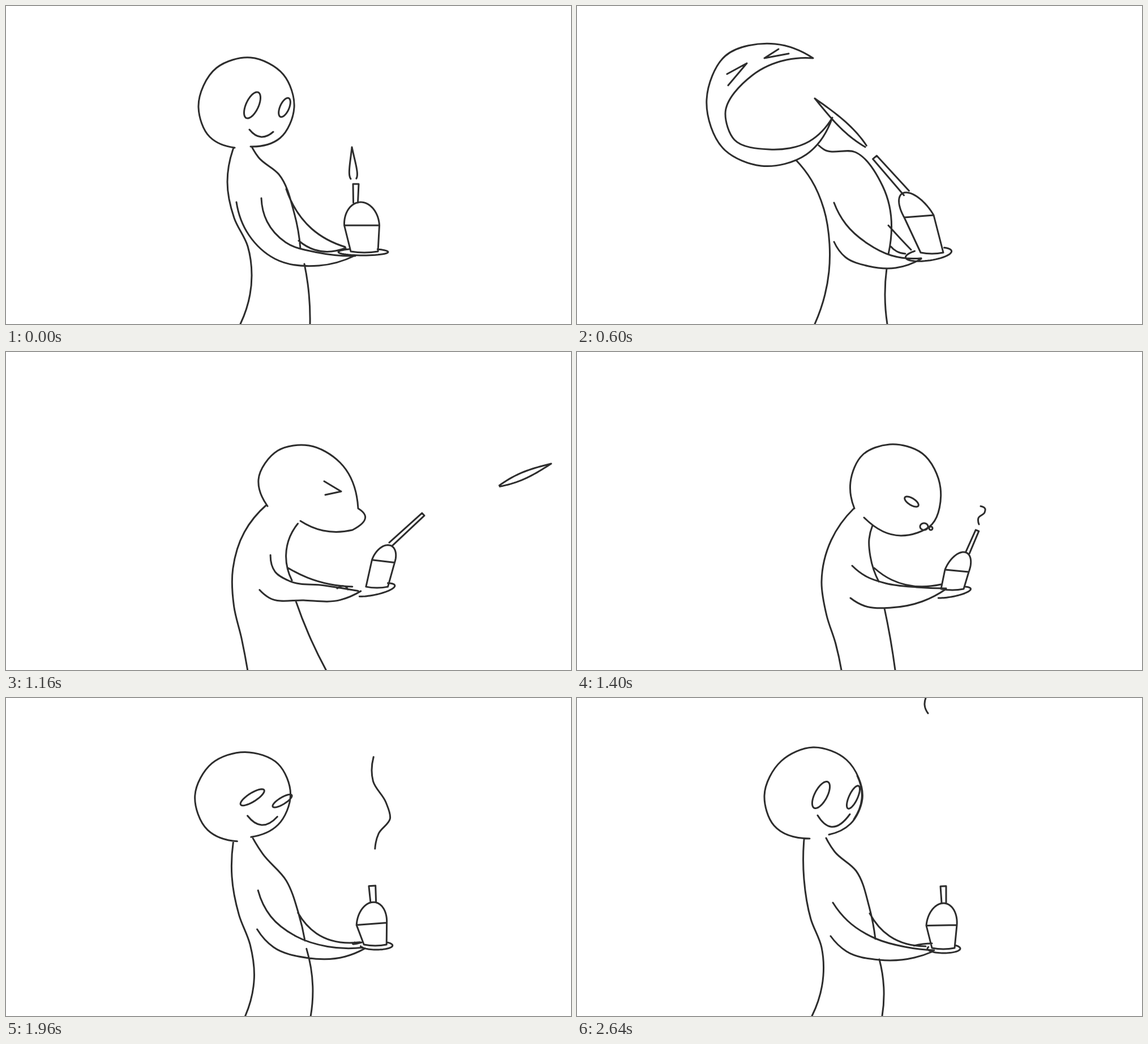
Animation, 998 px wide and 561 px high, one loop 2.88 s. Source, as an HTML page:

```html
<!DOCTYPE html>
<html lang="en">
<head>
<meta charset="utf-8">
<title>Birthday cupcake</title>
<style>
  html, body { margin: 0; width: 100%; height: 100%; overflow: hidden; background: #fff; }
  svg { display: block; width: 100%; height: 100%; }
  path { fill: none; stroke: #2d2d2d; stroke-width: 3; stroke-linecap: round; stroke-linejoin: round; }
</style>
</head>
<body>
<svg viewBox="0 0 998 561"><path id="ink"/></svg>
<script>
const line = pts => 'M' + pts.join('L');

// Smooth stroke through a few x, y pairs, with parabolic tangents.
function curve(flat) {
  const pts = [];
  for (let i = 0; i < flat.length; i += 2) pts.push([flat[i], flat[i + 1]]);
  if (!pts.length) return '';
  const end = pts.length - 1;
  const gaps = pts.slice(1).map((p, i) => Math.hypot(p[0] - pts[i][0], p[1] - pts[i][1]));
  const slope = (i, k) => (pts[i + 1][k] - pts[i][k]) / gaps[i];
  const tangent = (i, k) => {
    if (end === 1) return slope(0, k);
    if (i === 0) return 2 * slope(0, k) - tangent(1, k);
    if (i === end) return 2 * slope(end - 1, k) - tangent(end - 1, k);
    return (gaps[i] * slope(i - 1, k) + gaps[i - 1] * slope(i, k)) / (gaps[i - 1] + gaps[i]);
  };
  const handle = (i, len) => [0, 1].map(k => pts[i][k] + tangent(i, k) * len / 3);
  return `M${pts[0]}` + gaps.map((gap, i) =>
    `C${handle(i, gap)} ${handle(i + 1, -gap)} ${pts[i + 1]}`).join('');
}

// Arc of the ellipse spanned by the half axes (ux, uy) and (vx, vy).
function arc(x, y, ux, uy, vx, vy, from, to) {
  return line(Array.from({ length: 41 }, (_, i) => {
    const a = (from + (to - from) * i / 40) * Math.PI / 180, c = Math.cos(a), s = Math.sin(a);
    return [x + c * ux + s * vx, y + c * uy + s * vy];
  }));
}

function oval([x, y, rx, ry, tilt, from = 0, to = 360]) {
  const c = Math.cos(tilt * Math.PI / 180), s = Math.sin(tilt * Math.PI / 180);
  return arc(x, y, rx * c, rx * s, -ry * s, ry * c, from, to);
}

function cupcake([x, y, half, topX, topY, rimX, rimY, domeX, domeY]) {
  const left = [topX - rimX, topY - rimY], right = [topX + rimX, topY + rimY];
  return line([[x - half, y], left, right, [x + half, y]])
    + curve([x - half, y, x, y + 2, x + half, y])
    + arc(topX, topY, rimX, rimY, domeX, domeY, 0, 180);
}

// Point at fraction u of an axis, pushed sideways.
function beside(x, y, tipX, tipY, u, push) {
  const dx = tipX - x, dy = tipY - y, len = Math.hypot(dx, dy);
  return [x + dx * u - dy / len * push, y + dy * u + dx / len * push];
}

function candle([x, y, tipX, tipY, base, top]) {
  return line([[0, base], [1, top], [1, -top], [0, -base]].map(([u, push]) => beside(x, y, tipX, tipY, u, push)));
}

function flame([x, y, tipX, tipY, width, skew]) {
  return line(Array.from({ length: 41 }, (_, i) => {
    const side = i / 20 - 1, u = 1 - .96 * Math.abs(side);
    return beside(x, y, tipX, tipY, u, Math.sign(side) * width * Math.sin(Math.PI * u ** skew));
  }));
}

const vee = ([ax, ay, bx, by, cx, cy]) => line([[ax, ay], [bx, by], [cx, cy]]);
const each = shape => list => list.map(shape).join('');
const shapes = { head: each(curve), ovals: each(oval), squint: each(vee), plate: oval, cup: cupcake, candle, flame };
const toPath = pose => Object.keys(pose).map(key => (shapes[key] || curve)(pose[key])).join('');

const lerp = (a, b = a, t) => Array.isArray(a) ? a.map((v, i) => lerp(v, b[i], t)) : a + (b - a) * t;
const blend = (a, b, t, changes) => ({
  ...Object.fromEntries(Object.keys(a).map(key => [key, lerp(a[key], b[key], t)])),
  ...changes
});

const offer = {
  head: [[404, 250, 360, 231, 340, 179, 372, 109, 432, 91, 490, 121, 509, 179, 484, 233, 432, 248]],
  ovals: [[435, 175, 25, 11, -65], [492, 179, 18, 8, -66]],
  mouth: [430, 218, 451, 231, 472, 222],
  back: [402, 250, 391, 310, 403, 374, 427, 424, 434, 475, 414, 561],
  chest: [434, 248, 446, 267, 482, 297, 509, 365, 520, 428],
  belly: [527, 455, 533, 490, 537, 561],
  arm: [451, 339, 461, 380, 494, 417, 551, 435, 617, 441],
  underArm: [407, 346, 429, 404, 475, 446, 553, 458, 617, 440],
  farArm: [495, 323, 540, 393, 599, 425],
  farHand: [517, 414, 545, 430, 600, 427],
  plate: [631, 434, 44, 6, 0, -55, 235],
  cup: [633, 433, 24, 628.5, 387, 31, 0, -2, -41],
  candle: [617.5, 347, 618, 314, 4, 5],
  flame: [614, 307, 611, 249, 7, .43]
};

const inhale = {
  head: [
    [417, 92, 350, 67, 262, 88, 229, 165, 262, 255, 325, 282, 405, 262, 451, 197],
    [451, 197, 410, 239, 340, 253, 278, 236, 262, 190, 310, 122, 370, 95, 417, 92]
  ],
  squint: [[265, 120, 300, 101, 267, 140], [356, 76, 331, 92, 374, 84]],
  back: [387, 272, 414, 307, 436, 358, 446, 420, 445, 469, 420, 561],
  chest: [427, 246, 436, 253, 492, 258, 540, 318, 550, 438],
  belly: [547, 463, 544, 510, 548, 561],
  arm: [454, 347, 475, 385, 513, 419, 555, 440, 608, 445],
  underArm: [454, 416, 474, 443, 515, 459, 563, 462, 608, 446],
  farArm: [550, 387, 570, 409, 590, 430],
  farHand: [554, 424, 565, 433, 580, 437],
  plate: [621, 438, 41, 11, -8, -45, 235],
  cup: [627, 435, 20, 604, 371, 26, -2, -24, -42],
  candle: [582, 330, 526, 267, 6, 4.5],
  flame: [514, 251, 420, 163, 7, .8]
};

const blow = {
  head: [
    [453, 269, 428, 238, 429, 188, 460, 151, 503, 142, 553, 164, 579, 213, 600, 276],
    [600, 276, 612, 285], [612, 285, 600, 305, 585, 316], [585, 316, 581, 308],
    [581, 308, 545, 309, 509, 297]
  ],
  squint: [[540, 215, 569, 237, 540, 242]],
  back: [445, 266, 406, 310, 384, 370, 382, 440, 394, 500, 405, 561],
  chest: [512, 301, 494, 323, 482, 358, 483, 382, 490, 402],
  belly: [495, 432, 525, 496, 567, 561],
  arm: [457, 348, 456, 383, 477, 402, 540, 410, 606, 424],
  underArm: [429, 412, 442, 426, 510, 431, 580, 436, 613, 424],
  farArm: [484, 381, 520, 396, 595, 416],
  farHand: [585, 417, 600, 414, 604, 419],
  plate: [643, 417, 40, 10, -12, -45, 135],
  cup: [651, 412, 19, 664, 360, 19.5, 2.5, 8, -26],
  candle: [674, 331, 753, 271, 4, 3],
  flame: [771, 247, 932, 195, 9, .9]
};

const peer = {
  head: [[490, 276, 483, 230, 505, 181, 552, 163, 610, 179, 642, 240, 627, 304, 572, 324, 507, 292]],
  ovals: [[591, 264, 14, 6, 32], [613, 308, 7, 6, 0], [625, 311, 3, 3, 0]],
  back: [489, 276, 449, 332, 432, 405, 441, 465, 457, 515, 467, 561],
  chest: [522, 306, 516, 330, 518, 360, 524, 384, 533, 405],
  belly: [543, 452, 553, 503, 562, 561],
  arm: [486, 377, 511, 396, 545, 408, 600, 415, 652, 417],
  underArm: [483, 434, 508, 448, 555, 451, 610, 440, 652, 418],
  farArm: [525, 381, 556, 402, 643, 410],
  plate: [660, 424, 36, 8, -10, -45, 130],
  cup: [663, 418, 20, 671, 386, 21, 2, 13, -33],
  candle: [690, 354, 707, 315, 3.5, 3],
  smoke: [710, 304, 709, 293, 720, 283, 721, 277, 713, 272]
};

const smile = {
  head: [[406, 256, 361, 238, 335, 172, 365, 118, 425, 101, 483, 121, 501, 165, 478, 225, 424, 248]],
  ovals: [[436, 176, 30, 8, -60], [488, 180, 24, 6, -62]],
  mouth: [427, 211, 449, 224, 474, 211],
  back: [401, 257, 397, 312, 410, 378, 430, 432, 440, 495, 427, 561],
  chest: [433, 248, 452, 278, 496, 334, 516, 386, 528, 430],
  belly: [528, 430, 541, 505, 537, 561],
  arm: [440, 325, 460, 380, 500, 417, 560, 438, 629, 437],
  underArm: [440, 400, 470, 435, 530, 456, 600, 455, 637, 438],
  farArm: [514, 378, 545, 412, 631, 426],
  farHand: [629, 427, 614, 432, 628, 430],
  plate: [658, 433, 28, 7, 0, -50, 150],
  cup: [655, 431, 20, 646.5, 397, 26.5, -3, 1, -38],
  candle: [648.5, 358, 646, 331, 5.5, 6.5],
  smoke: [654, 172, 664, 203, 697, 232, 692, 258, 655, 286, 649, 318]
};

const smirk = {
  head: [[412, 248, 349, 225, 332, 172, 362, 111, 418, 87, 477, 109, 505, 178, 484, 222, 446, 241]],
  ovals: [[434, 174, 16, 7, 10], [488, 184, 13, 6, 15]],
  mouth: [426, 203, 455, 224, 487, 207],
  back: [402, 250, 402, 320, 414, 390, 433, 440, 436, 490, 416, 561],
  chest: [441, 247, 456, 271, 494, 305, 517, 368, 528, 425],
  belly: [535, 461, 543, 515, 540, 561],
  arm: [453, 361, 479, 393, 530, 425, 580, 439, 632, 445],
  underArm: [449, 420, 477, 447, 535, 462, 597, 458, 630, 447],
  farArm: [518, 380, 553, 420, 617, 438],
  farHand: [596, 437, 612, 434, 628, 433],
  plate: [649, 442, 29, 8, 0, -45, 200],
  cup: [648, 441, 20, 645, 401, 27, -.5, 3, -39],
  candle: [649, 361, 648, 332, 4, 5],
  smoke: [642, 2, 625, 62, 632, 112, 658, 145, 663, 169, 656, 188]
};

const leanBack = blend(offer, inhale, .58, {
  head: [
    [450, 96, 360, 65, 296, 98, 277, 170, 318, 250, 385, 265, 440, 240, 462, 195],
    [462, 195, 400, 210, 366, 165, 395, 112, 450, 96]
  ],
  ovals: [],
  mouth: [],
  squint: [[308, 132, 342, 116, 313, 150], [396, 80, 370, 95, 412, 90]]
});

const puff = blend(blow, peer, .35, {
  head: [
    [462, 272, 446, 225, 480, 174, 535, 165, 590, 195, 622, 276],
    [622, 276, 634, 288, 612, 314], [612, 314, 560, 315, 520, 298]
  ],
  squint: [[562, 228, 592, 246, 564, 252]],
  flame: [868, 238, 963, 197, 6, .9]
});

const rise = blend(peer, smile, .25, {
  head: lerp(peer.head, smile.head, .37),
  ovals: [[527, 217, 18, 8, -62], [575, 220, 14, 6, -62]],
  mouth: [520, 250, 537, 260, 556, 251],
  smoke: [704, 216, 702, 232, 717, 253, 701, 275, 699, 300]
});

const wide = {
  ...smirk,
  ovals: [[432, 171, 26, 11, -62], [489, 175, 22, 7.5, -65]],
  smoke: [627, 0, 619, 35, 633, 65, 629, 85]
};
const halfOpen = blend(smirk, wide, .5, { smoke: [632, 0, 626, 50, 648, 90, 647, 125] });
const rest = {
  ...wide,
  mouth: [426, 207, 449, 227, 483, 205],
  cheek: [496, 137, 504, 178, 490, 214],
  smoke: [617, 0, 615, 12, 621, 27]
};

const scenes = [
  [0, offer], [320, leanBack], [600, inhale], [920, blow], [1160, puff],
  [1400, peer], [1560, rise], [1720, smile], [1960, blend(smile, smirk, .4)],
  [2120, smirk], [2320, halfOpen], [2440, wide], [2640, rest, -1]
].map(([start, pose, dx = 0]) => ({ start, dx, d: toPath(pose) }));

const ink = document.getElementById('ink');
const begin = performance.now();
let shown;

function draw() {
  const time = Math.max(0, performance.now() - begin) % 2880;
  const scene = scenes.findLast(s => s.start <= time);
  if (scene !== shown) {
    ink.setAttribute('d', scene.d);
    ink.setAttribute('transform', `translate(${scene.dx})`);
    shown = scene;
  }
  requestAnimationFrame(draw);
}
draw();
</script>
</body>
</html>
```
